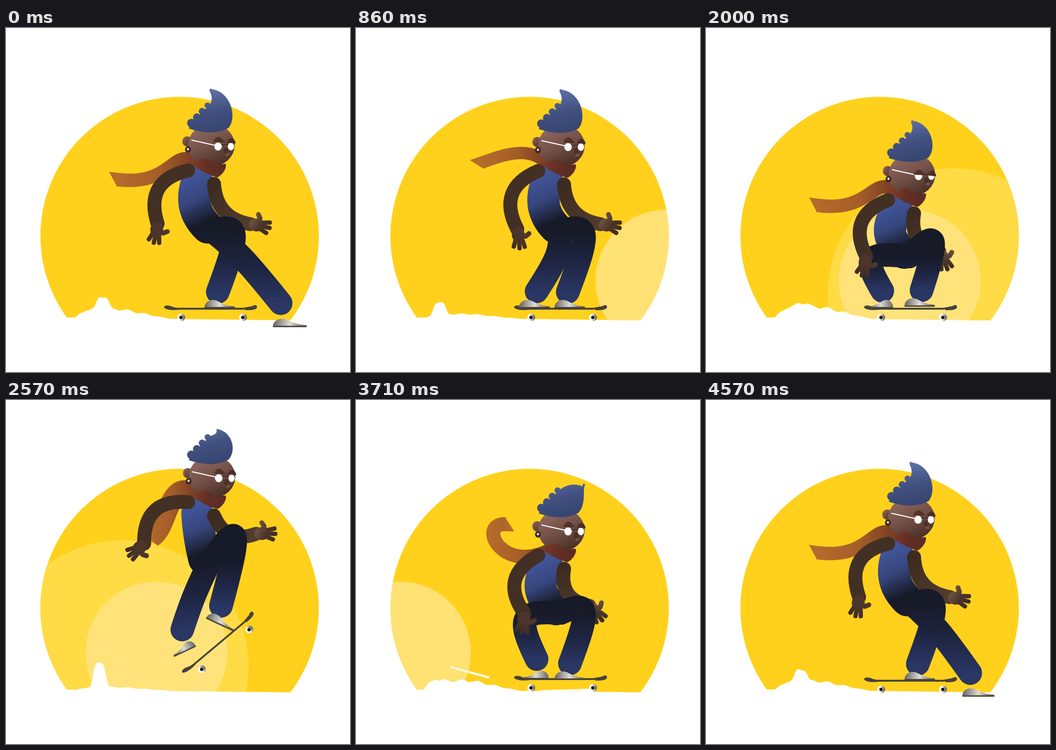
Animation of 640 by 640 pixels, one loop 4640 ms. Source, as an HTML page with a canvas:

```html
<!DOCTYPE html>
<html lang="en">
<head>
<meta charset="utf-8">
<title>Skateboarder</title>
<style>
html, body { margin: 0; width: 100%; height: 100%; overflow: hidden; background: #fff; }
canvas { display: block; width: 640px; height: 640px; }
</style>
</head>
<body>
<canvas id="stage" width="640" height="640"></canvas>
<script>
const ctx = document.getElementById('stage').getContext('2d');
const LOOP = 4640, STEPS = 65;

// Legs: knee and ankle. Hands: wrist and angle. Toe: offset of the rear shoe and its x scale.
// Tip (of the hair) and tail (two controls, end, width) move with the body offset dy.
const push = {
  dy: 0, lid: 0, lean: 14, tilt: 0,
  board: [378, 521, 0], hip: [384, 378],
  legA: [440, 428, 511, 512], legB: [424, 386, 394, 491], toe: [17, 44, 1.25],
  handF: [282, 364, 8], handB: [455, 365, -82],
  tip: [381, 113], tail: [310, 212, 315, 296, 207, 282, 25]
};
const drag = { ...push, legA: [407, 434, 418, 510] };
const kick = { ...push, legA: [366, 428, 315, 492], toe: [-6, 40, 1.1] };
const ride = {
  ...push, dy: 1, hip: [380, 378],
  legA: [373, 425, 336, 490], toe: [-4, 31, 1.14], handF: [300, 374, -10],
  tail: [325, 214, 272, 236, 232, 250, 23]
};
const crouch = {
  ...push, dy: 55, lid: 1, lean: 20, hip: [378, 425],
  legA: [309, 430, 328, 489], legB: [422, 398, 401, 488], toe: [-3, 32, -.92],
  handF: [298, 425, 10], handB: [434, 416, -28],
  tip: [384, 117], tail: [310, 207, 315, 290, 207, 275, 25]
};
const leap = {
  ...push, dy: -75, lean: 2, tilt: 25, board: [393, 454, -40], hip: [378, 303],
  legA: [350, 365, 328, 427], legB: [426, 256, 400, 383], toe: [5, 41, -.9],
  handF: [257, 267, 48], handB: [465, 249, -93],
  tip: [394, 129], tail: [300, 208, 305, 310, 272, 330, 38]
};
const fall = {
  ...push, dy: -62, lean: 18, tilt: 11, board: [392, 455, -29], hip: [376, 312],
  legA: [325, 338, 325, 406], legB: [422, 282, 402, 386], toe: [-3, 43, -1.02],
  handF: [264, 287, 15], handB: [463, 266, -100],
  tip: [384, 132], tail: [300, 206, 320, 320, 270, 292, 36]
};
const land = {
  ...push, dy: 24, lean: 20, board: [378, 518, 0], hip: [381, 396],
  legA: [316, 408, 336, 482], legB: [424, 395, 398, 490], toe: [-2, 37, -.98],
  handF: [313, 397, 4], handB: [434, 383, -45],
  tip: [424, 132], tail: [270, 300, 225, 205, 278, 207, 26]
};
const step = {
  ...push, dy: 12, hip: [381, 386],
  legA: [398, 432, 405, 490], toe: [7, 41, .9], handF: [297, 378, 6], handB: [446, 374, -70]
};

const linear = u => u;
const smooth = u => u * u * (3 - 2 * u);
// Each row: time, state, easing towards the next row
const poses = [
  [0, push, smooth], [300, drag, smooth], [560, kick, smooth], [780, ride, smooth],
  [1350, ride, smooth], [1900, crouch, smooth], [2060, crouch, smooth], [2420, leap, smooth],
  [2750, leap, smooth], [3070, fall, linear], [3420, land, smooth], [3900, land, smooth],
  [4250, step, linear], [LOOP, push, linear]
];
// Spread of the cloud, then place and height of its plume
const smoke = [
  [0, [.8, 180, 24], linear], [860, [.4, 155, 22], linear], [2000, [1, 180, 8], linear],
  [2570, [.3, 174, 46], linear], [3065, [0, 170, 0], linear], [3400, [0, 140, 0], linear],
  [3710, [.85, 140, 6], linear], [LOOP, [.8, 180, 24], linear]
];

function mix(a, b, u) {
  if (typeof a === 'number') return a + (b - a) * u;
  if (Array.isArray(a)) return a.map((v, i) => mix(v, b[i], u));
  return Object.fromEntries(Object.keys(a).map(k => [k, mix(a[k], b[k], u)]));
}

function at(track, t) {
  let i = 0;
  while (i < track.length - 2 && t >= track[i + 1][0]) i++;
  const [t0, a, ease] = track[i], [t1, b] = track[i + 1];
  return mix(a, b, ease((t - t0) / (t1 - t0)));
}

const clamp = v => Math.max(0, Math.min(1, v));

function shade(x0, y0, x1, y1, ...stops) {
  const g = ctx.createLinearGradient(x0, y0, x1, y1);
  stops.forEach((c, i) => g.addColorStop(i / (stops.length - 1), c));
  return g;
}

function stroke(style, width, cap = 'round') {
  ctx.strokeStyle = style;
  ctx.lineWidth = width;
  ctx.lineCap = cap;
  ctx.lineJoin = 'round';
  ctx.stroke();
}

function oval(x, y, rx, ry, style) {
  ctx.beginPath();
  ctx.ellipse(x, y, rx, ry, 0, 0, 7);
  ctx.fillStyle = style;
  ctx.fill();
}

function shape(d, style) {
  ctx.fillStyle = style;
  ctx.fill(new Path2D(d));
}

function trace(points) {
  ctx.beginPath();
  points.forEach(p => ctx.lineTo(...p));
}

function line(style, width, ...points) {
  trace(points);
  stroke(style, width);
}

function group(x, y, angle, sx, draw) {
  ctx.save();
  ctx.translate(x, y);
  ctx.rotate(angle * Math.PI / 180);
  ctx.scale(sx, 1);
  draw();
  ctx.restore();
}

// Curve from a to b whose middle is m; a higher pull makes a tighter joint
function limb(a, m, b, width, style, pull = 2 / 3) {
  const rest = .5 - .375 * pull;
  const k = m.map((v, i) => (v - rest * (a[i] + b[i])) / (.75 * pull));
  ctx.beginPath();
  ctx.moveTo(...a);
  ctx.bezierCurveTo(...mix(a, k, pull), ...mix(b, k, pull), ...b);
  stroke(style, width);
}

// Middle of a to b, pushed sideways
function bow(a, b, amount) {
  const dx = b[0] - a[0], dy = b[1] - a[1], k = amount / Math.hypot(dx, dy);
  return [(a[0] + b[0]) / 2 - dy * k, (a[1] + b[1]) / 2 + dx * k];
}

function arm(shoulder, [x, y, angle], bend, from, to, light) {
  const wrist = [x, y];
  limb(shoulder, bow(shoulder, wrist, bend), wrist, 26, shade(...shoulder, x, y, from, to));
  group(x, y, angle, 1, () => {
    const skin = shade(10, 4, -6, 38, light, '#4a342a', '#3f2c22');
    oval(0, 11, 12, 14, skin);
    for (let i = -1; i <= 1; i++) line(skin, 8, [i * 5, 16], [i * 10 - 2, 38 - 5 * Math.abs(i - .4)]);
    line(skin, 9, [4, 14], [13, 16], [20, 12]);
  });
}

function leg(hip, [kx, ky, ax, ay]) {
  const cloth = shade(0, Math.min(hip[1], ky + 40), 0, ay, '#171a27', '#1e2542', '#2a3663');
  limb(hip, [kx, ky], [ax, ay], 44, cloth, .85);
}

function shoe(x, y, angle, sx) {
  group(x, y, angle, sx, () => {
    shape('M-25 0C-26-8-19-16-11-15C-1-15 2-5 25-3L25 0Z',
      shade(-25, -4, 25, 0, '#69655f', '#a5a29d', '#dedcd6', '#97938b', '#58524b'));
    ctx.fillStyle = '#4b453d';
    ctx.fillRect(-25, -2, 50, 2.6);
  });
}

function board([x, y, angle]) {
  group(x, y, angle, 1, () => {
    for (const w of [-52, 63]) {
      oval(w, 17.5, 7.2, 7.2, shade(w - 7, 0, w + 7, 0, '#fff', '#fff', '#aaa', '#55524e'));
      oval(w - .5, 17.5, 3, 3, '#000');
    }
    const wood = '#46413a';
    line(wood, 3.4, [-78, -2], [-62, 1.2], [64, 1.2], [82, -2]);
    shape('M-84-2C-82-6-73-5-68-2L-55 1L-55 3C-67 5-84 3-84-2Z', wood);
    shape('M89-3C88-7 82-6 79-2L67 1L67 4C77 4 90 4 89-3Z', wood);
  });
}

function backdrop(t) {
  ctx.fillStyle = '#fff';
  ctx.fillRect(0, 0, 640, 640);
  ctx.save();
  trace([[0, 0], [640, 0], [640, 545.5], [530, 544], [112, 538.5], [0, 537]]);
  ctx.clip();
  oval(323, 387, 259, 259, '#ffd11c');
  ctx.clip();
  const late = Math.max(0, t - 2570) / 500;
  const r = 235 - 29 * late;
  oval(461 - .43 * (t - 2000) + 16 * late, 496 + 4 * late, r, r, '#ffdb45');
  ctx.globalAlpha = .85;
  oval(577 - .1737 * (t - 860), 470, 132, 132, '#ffe484');
  ctx.restore();

  const [spread, peak, height] = at(smoke, t);
  const top = [[112, 550]];
  for (let x = 112; x <= 308; x += 2) {
    const cloud = (22 + 3 * Math.sin(x / 5)) * spread * clamp((x - 125) / 25) * clamp((305 - x) / 90);
    const plume = height * Math.exp(-(((x - peak) / 13) ** 4));
    top.push([x, 541 - cloud - plume]);
  }
  trace([...top, [308, 550]]);
  ctx.fillStyle = '#fff';
  ctx.fill();

  if (t > 3560 && t < 3860) {
    const x = .3 * (3710 - t);
    line(shade(175 + x, 0, 248 + x, 0, '#fff3c8', '#fff'), 4, [177 + x, 497], [247 + x, 516]);
    shape('M342 540L440 537L445 545L410 542L342 542Z', '#fff');
  }
}

function tail([ax, ay, bx, by, x, y, width]) {
  const style = shade(Math.min(x, 250), 0, 362, 0, '#b46b2b', '#a65e29', '#6f3723');
  ctx.beginPath();
  ctx.moveTo(360, 256);
  ctx.bezierCurveTo(ax, ay, bx, by, x, y);
  stroke(style, width, 'butt');
  // slanted end
  group(x, y, Math.atan2(y - by, x - bx) * 180 / Math.PI, 1, () => {
    const h = width / 2;
    shape(`M-1 ${-h}L-1 ${h}L17 ${h}Z`, '#b46b2b');
  });
}

function hair([x, y]) {
  const style = shade(378, 118, 395, 194, '#5d6fa4', '#41507f', '#35456f');
  const sweep = x - 381;
  shape(`M340 187Q385 202 414 186C430 168 420 ${y + 7} ${x + 3} ${y + 1}
    Q${x - 4} ${y - 2} ${x - 2} ${y + 5}
    Q${386 + sweep * .35} ${y + 17 - sweep * .5} 380 142L345 176Z`, style);
  for (let i = 0; i < 4; i++) {
    const r = 8 - i * .8;
    oval(345 + 10 * i, 177 - 11 * i, r, r, style);
  }
}

function head(lid) {
  oval(337, 211, 9, 9.5, shade(330, 204, 345, 218, '#8a6258', '#4a3128'));
  oval(382, 218, 43.5, 39.5, shade(358, 186, 392, 256, '#8d675f', '#735047', '#4b3228'));
  oval(338.5, 226, 5.5, 6, '#3b2820');
  oval(338.5, 225.5, 2, 2.2, '#f3e9d8');
  shape('M345 207.5L390 217.5L390 219.5L345 209.5Z', '#fff');
  line('#4b2f27', 2, [400, 217], [414, 217]);
  oval(409, 228, 4, 6, '#4a3027');
  oval(412, 235.5, 4, 2.5, '#7d504b');
  oval(394.5, 220.5, 7, 7.4, '#fff');
  oval(418.5, 220.5, 5.8, 7.2, '#fff');
  group(0, 6 * lid, 0, 1, () => {
    const brow = shade(386, 203, 428, 214, '#55352b', '#472c24');
    shape('M385 212C389 205 393 201 398 203C402 206 405 209 408 213Z', brow);
    shape('M410 213C414 208 417 204 421 205C425 207 427 211 427 215Z', brow);
  });
}

function knot() {
  shape('M343 254C350 243 358 250 363 245C374 239 380 249 388 253C395 256 402 252 409 253C411 262 402 274 393 278C380 274 362 266 350 257Z',
    shade(345, 250, 400, 262, '#7d3f25', '#642f25', '#5d2c25'));
}

function rider(p) {
  const { dy, hip, legA, legB, toe } = p;
  const withBody = (dx, draw) => group(dx, dy, 0, 1, draw);

  withBody(0, () => tail(p.tail));
  board(p.board);

  const chest = [356, 286 + dy], waist = [hip[0] - 9, hip[1] - 7];
  limb(chest, bow(chest, waist, p.lean), waist, 60,
    shade(340, 276 + dy, waist[0] + 4, waist[1] - 14, '#42559a', '#36457c', '#171a27'));

  arm([387, 290 + dy], p.handB, 20, '#3d2b21', '#523d2e', '#6a5040');
  leg(hip, legB);
  shoe(397.5, legB[3] + 30 + p.tilt / 5, p.tilt, 1.12);
  leg(hip, legA);
  shoe(legA[2] + toe[0], legA[3] + toe[1], -p.tilt, toe[2]);

  withBody(p.lid + p.tilt / 20, () => head(p.lid));
  withBody(0, () => {
    hair(p.tip);
    knot();
  });
  arm([339, 265 + dy], p.handF, 31, '#433024', '#433024', '#4d372c');
}

const start = performance.now();

function frame() {
  const now = (performance.now() - start) % LOOP;
  const t = Math.floor(now * STEPS / LOOP + .05) % STEPS * LOOP / STEPS;
  backdrop(t);
  rider(at(poses, t));
  requestAnimationFrame(frame);
}
frame();
</script>
</body>
</html>
```
